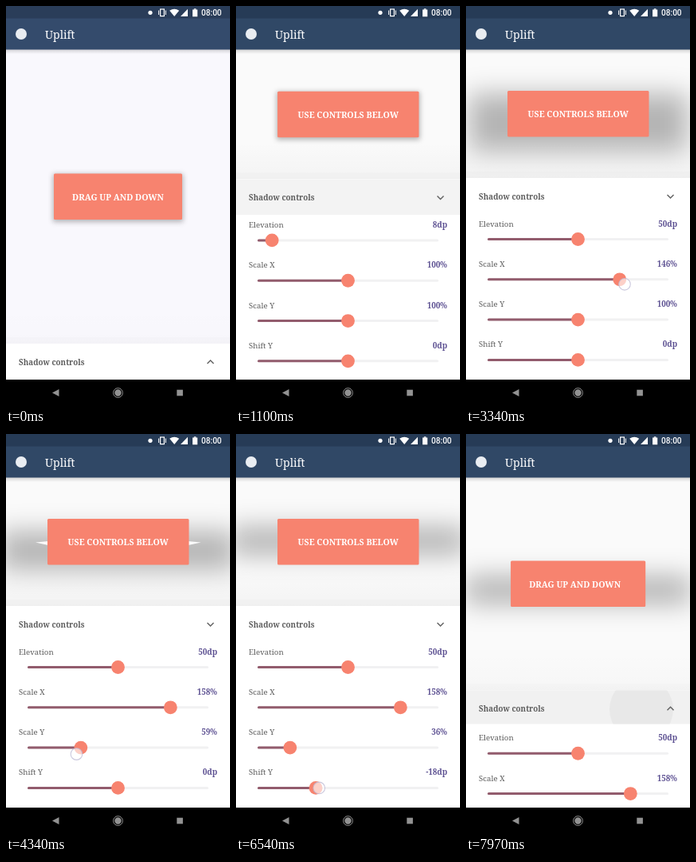
Write an HTML page with a canvas that moves like this. It is 281x500 px and loops after 8 s.

```html
<!DOCTYPE html>
<html lang="en">
<head>
<meta charset="utf-8">
<title>Shadow controls</title>
<style>
  html, body { margin: 0; width: 100%; height: 100%; overflow: hidden; background: #000; }
  canvas { display: block; width: 281px; height: 500px; }
</style>
</head>
<body>
<canvas id="stage"></canvas>
<script>
const W = 281, H = 500, LOOP = 8000;
const SERIF = '"Noto Serif", serif';
const CORAL = '#f7836f';
const canvas = document.getElementById('stage');
const ctx = canvas.getContext('2d');
const dpr = window.devicePixelRatio || 1;
canvas.width = W * dpr;
canvas.height = H * dpr;

const clamp = (v, lo = 0, hi = 1) => Math.min(hi, Math.max(lo, v));
const mix = (a, b, k) => a + (b - a) * k;
const ramp = (t, a, b) => clamp((t - a) / (b - a));

// Material standard curve, cubic-bezier(.4, 0, .2, 1)
function standard(x) {
  let lo = 0, hi = 1, s = 0.5;
  for (let i = 0; i < 24; i++) {
    s = (lo + hi) / 2;
    const r = 1 - s;
    if (1.2 * r * r * s + 0.6 * r * s * s + s * s * s < x) lo = s; else hi = s;
  }
  return s * s * (3 - 2 * s);
}

// Monotone cubic through [time, value] keys
function track(keys, t) {
  const n = keys.length - 1;
  if (t <= keys[0][0]) return keys[0][1];
  if (t >= keys[n][0]) return keys[n][1];
  const slope = i => (keys[i + 1][1] - keys[i][1]) / (keys[i + 1][0] - keys[i][0]);
  const tangent = i => {
    if (i === 0 || i === n) return 0;
    const a = slope(i - 1), b = slope(i);
    return a * b <= 0 ? 0 : 2 * a * b / (a + b);
  };
  let i = 0;
  while (t > keys[i + 1][0]) i++;
  const [t0, v0] = keys[i], [t1, v1] = keys[i + 1];
  const d = t1 - t0, u = (t - t0) / d, r = 1 - u;
  return v0 * (1 + 2 * u) * r * r + tangent(i) * d * u * r * r
       + v1 * u * u * (3 - 2 * u) - tangent(i + 1) * d * u * u * r;
}

const sliders = [
  { name: 'Elevation', unit: 'dp', min: 0, max: 100, touch: [2000, 2740], dy: 5.5,
    keys: [[2080, 8], [2370, 43], [2640, 50]] },
  { name: 'Scale X', unit: '%', min: 0, max: 200, touch: [2880, 3600], dy: 6,
    keys: [[2940, 100], [3220, 134], [3540, 158]] },
  { name: 'Scale Y', unit: '%', min: 0, max: 200, touch: [3720, 4920], dy: 8,
    keys: [[3950, 100], [4340, 59], [4640, 40], [4880, 36]] },
  { name: 'Shift Y', unit: 'dp', min: -50, max: 50, touch: [5110, 7330], dy: 0,
    keys: [[5280, 0], [5550, 12], [5840, -7], [6200, -24], [6600, -16], [6900, 6], [7250, -5]] }
];
const sliderX = (s, v) => 27 + 227 * (v - s.min) / (s.max - s.min);

function rect(x, y, w, h, fill) {
  ctx.fillStyle = fill;
  ctx.fillRect(x, y, w, h);
}
function round(x, y, w, h, r, fill) {
  ctx.fillStyle = fill;
  ctx.beginPath();
  ctx.roundRect(x, y, w, h, r);
  ctx.fill();
}
function disc(x, y, r, fill) {
  ctx.fillStyle = fill;
  ctx.beginPath();
  ctx.arc(x, y, r, 0, Math.PI * 2);
  ctx.fill();
}
function shape(points, fill) {
  ctx.fillStyle = fill;
  ctx.beginPath();
  points.forEach(p => ctx.lineTo(...p));
  ctx.fill();
}
function line(points, color, width) {
  ctx.strokeStyle = color;
  ctx.lineWidth = width;
  ctx.beginPath();
  points.forEach(p => ctx.lineTo(...p));
  ctx.stroke();
}
function text(str, x, y, font, fill, align = 'left') {
  ctx.font = font;
  ctx.fillStyle = fill;
  ctx.textAlign = align;
  ctx.fillText(str, x, y);
}
function fade(y, h, from, to) {
  const g = ctx.createLinearGradient(0, y, 0, y + h);
  g.addColorStop(0, from);
  g.addColorStop(1, to);
  rect(0, y, W, h, g);
}

function drawShadow(x, y, w, h, [elev, sx, sy, shift]) {
  const grow = elev * 0.15;
  const sw = w * sx / 100 + 2 * grow, sh = h * sy / 100 + 2 * grow;
  const cx = x + w / 2, cy = y + h / 2 + elev * 0.22 + shift * 0.683;
  ctx.save();
  ctx.filter = `blur(${(0.5 + elev * 0.31) * dpr}px)`;
  rect(cx - sw / 2, cy - sh / 2, sw, sh, 'rgba(0,0,0,.28)');
  ctx.restore();
  // Gap left by the squashed outline
  if (sy > 50 && sy < 68) {
    shape([[x - 15, y + 29.5], [x + 1, y + 28], [x + 1, y + 33]], '#fbfbfb');
    shape([[x + w + 15, y + 29.5], [x + w - 1, y + 28], [x + w - 1, y + 33]], '#fbfbfb');
  }
}

function drawButton(p, open, values) {
  const x = mix(60, 52, p), y = mix(209.5, 106, p), w = mix(161, 177.5, p), h = 57.5;
  drawShadow(x, y, w, h, values);
  round(x, y, w, h, 1.5, CORAL);
  const label = open ? 'USE CONTROLS BELOW' : 'DRAG UP AND DOWN';
  text(label, x + (open ? 88.7 : 80.5), y + 33, `bold 10.6px ${SERIF}`, '#fff', 'center');
}

function drawRipple(age, top, height) {
  if (age < 0 || age > 800) return;
  const out = 1 - ramp(age, 560, 800);
  ctx.save();
  ctx.beginPath();
  ctx.rect(0, top, W, height);
  ctx.clip();
  rect(0, top, W, height, `rgba(0,0,0,${0.055 * ramp(age, 0, 120) * out})`);
  const r = 40 * Math.min(1, age / 370) + 240 * ramp(age, 370, 600) ** 2;
  disc(220, top + 24, r, `rgba(0,0,0,${0.04 * (1 - ramp(age, 370, 600))})`);
  ctx.restore();
}

function drawSlider(s, v, y) {
  text(s.name, 16, y + 3.5, `9.7px ${SERIF}`, '#5c5c5c');
  text(Math.round(v) + s.unit, 265, y + 3.5, `bold 9.8px ${SERIF}`, '#5d5192', 'right');
  const x = sliderX(s, v), ty = y + 19.5;
  round(27, ty - 1.5, 227, 3, 1.5, '#f1f1f2');
  round(27, ty - 1.5, x - 27, 3, 1.5, '#925c6d');
  disc(x, ty, 8.4, CORAL);
}

function drawPanel(p, open, age, values) {
  const mid = mix(445, 238, p), top = mid - 23, body = mix(484, 272, p);
  fade(top - 46, 46, 'rgba(0,0,0,0)', `rgba(0,0,0,${mix(0.008, 0.026, p)})`);
  fade(top - 8, 8, 'rgba(0,0,0,.012)', 'rgba(0,0,0,.016)');
  rect(0, top, W, H - top, '#fff');
  drawRipple(age, top, mix(46, 45, p) - 4 * p * (1 - p) * 3);
  text('Shadow controls', 16, mid + 3.5, `bold 9.8px ${SERIF}`, '#5e5e5e');
  const k = open ? 2 : -2;
  line([[252.5, mid - k], [256.5, mid + k], [260.5, mid - k]], '#606060', 1.4);
  sliders.forEach((s, i) => drawSlider(s, values[i], body + i * 50.3));
}

function drawBars(idle) {
  fade(54, 6, 'rgba(0,0,0,.16)', 'rgba(0,0,0,0)');
  rect(0, 0, W, 16, idle ? '#2a3d59' : '#263b56');
  rect(0, 15.5, W, 39, idle ? '#344b6c' : '#304866');
  disc(19, 35, 7, '#e9edf2');
  text('Uplift', 49, 40.5, `14px ${SERIF}`, '#fff');

  disc(181, 8.3, 2.6, '#fff');
  ctx.strokeStyle = '#fff';
  ctx.lineWidth = 1.2;
  ctx.strokeRect(193.6, 4, 4.8, 8.6);
  line([[191.6, 5.5], [191.6, 11]], '#fff', 1);
  line([[200.4, 5.5], [200.4, 11]], '#fff', 1);
  ctx.fillStyle = '#fff';
  ctx.beginPath();
  ctx.moveTo(211.2, 13);
  ctx.lineTo(205.2, 5.8);
  ctx.quadraticCurveTo(211.2, 1.8, 217.2, 5.8);
  ctx.fill();
  shape([[219, 13], [228, 13], [228, 3.8]], '#fff');
  rect(234, 4.5, 6.2, 8.8, '#fff');
  rect(235.8, 3.3, 2.6, 1.5, '#fff');
  text('08:00', 270.5, 12.2, '500 10px Roboto, sans-serif', '#fff', 'right');

  rect(0, 467, W, 33, '#000');
  shape([[58, 483.5], [66.5, 479], [66.5, 488]], '#929292');
  disc(140.5, 483.5, 4.2, '#929292');
  ctx.strokeStyle = '#929292';
  ctx.lineWidth = 1;
  ctx.beginPath();
  ctx.arc(140.5, 483.5, 5.9, 0, Math.PI * 2);
  ctx.stroke();
  rect(214.3, 479.7, 7.6, 7.6, '#929292');
}

function drawTouch(x, y) {
  disc(x, y, 7.3, 'rgba(255,255,255,.62)');
  ctx.strokeStyle = 'rgba(190,186,212,.8)';
  ctx.lineWidth = 1.1;
  ctx.beginPath();
  ctx.arc(x, y, 7.3, 0, Math.PI * 2);
  ctx.stroke();
}

function drawTouches(t) {
  if (t >= 500 && t < 610) drawTouch(220, 446);
  if (t >= 7600 && t < 7710) drawTouch(220, 239);
  sliders.forEach((s, i) => {
    if (t < s.touch[0] || t >= s.touch[1]) return;
    // The finger runs slightly ahead of the thumb
    drawTouch(sliderX(s, track(s.keys, t + 60)), 291.5 + i * 50.3 + s.dy);
  });
}

function draw(t) {
  const open = t >= 700 && t < 7812, idle = t < 500;
  const p = standard(ramp(t, 700, 1150)) - standard(ramp(t, 7812, 8262));
  const values = sliders.map(s => track(s.keys, t));
  ctx.setTransform(dpr, 0, 0, dpr, 0, 0);
  rect(0, 0, W, H, idle ? '#f9f8fd' : '#fafafa');
  drawButton(p, open, values);
  drawPanel(p, open, t < 4000 ? t - 500 : t - 7600, values);
  drawBars(idle);
  drawTouches(t);
}

const start = performance.now();
function tick() {
  draw((performance.now() - start) % LOOP);
  requestAnimationFrame(tick);
}
tick();
</script>
</body>
</html>
```
